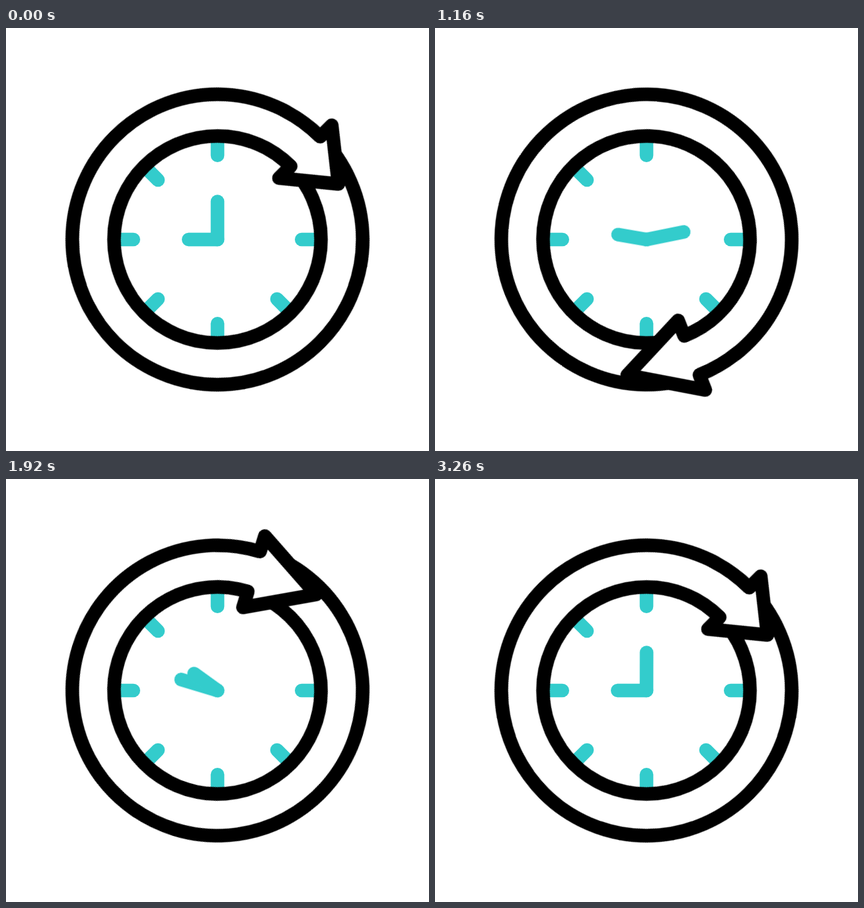
An HTML page for the animation above (3.6 s loop, 640 by 640 pixels).

```html
<!DOCTYPE html>
<html lang="en">
<head>
<meta charset="utf-8">
<title>Clock with turning arrow</title>
<style>
  html, body { margin: 0; width: 100%; height: 100%; overflow: hidden; background: #fff; }
  svg { display: block; width: 100%; height: 100%; }

  .ink, .teal { fill: none; stroke-width: 20.6; stroke-linecap: round; stroke-linejoin: round; }
  .ink { stroke: #000; }
  .teal { stroke: #33cccc; }

  .arrow, .head, .minute, .hour { animation: 3600ms linear infinite; }
  .arrow { animation-name: turn; }
  .head { animation-name: stretch; }
  .minute { animation-name: minute; }
  .hour { animation-name: hour; }

  /* Pull back, then one full turn */
  @keyframes turn {
    0% { transform: rotate(45deg); }
    5.5556% { transform: rotate(45deg); animation-timing-function: cubic-bezier(.333, 0, .667, 1); }
    16.6667% { transform: rotate(15deg); animation-timing-function: cubic-bezier(.333, 0, .3, 1); }
    68.3333%, 100% { transform: rotate(405deg); }
  }

  /* The tip shortens while pulling back and lengthens at speed */
  @keyframes stretch {
    0% { d: path("M0 -220 L0 -244.5 L70 -188.8 L0 -131.5 L0 -156.6"); }
    5.5556% {
      d: path("M0 -220 L0 -244.5 L70 -188.8 L0 -131.5 L0 -156.6");
      animation-timing-function: cubic-bezier(.333, 0, .667, 1);
    }
    16.6667% {
      d: path("M0 -220 L0 -244.5 L44.7 -187 L0 -131.5 L0 -156.6");
      animation-timing-function: cubic-bezier(.333, 0, .667, 1);
    }
    40.5556% {
      d: path("M0 -220 L0 -244.5 L124 -178 L0 -131.5 L0 -156.6");
      animation-timing-function: cubic-bezier(.333, 0, .667, 1);
    }
    68.3333%, 100% { d: path("M0 -220 L0 -244.5 L70 -188.8 L0 -131.5 L0 -156.6"); }
  }

  /* Hands run forward with the arrow, then rewind */
  @keyframes minute {
    0% { transform: rotate(0deg); }
    16.6667% { transform: rotate(0deg); animation-timing-function: cubic-bezier(.333, 0, .667, 1); }
    68.3333% { transform: rotate(360deg); animation-timing-function: cubic-bezier(.333, 0, .667, 1); }
    90.8333%, 100% { transform: rotate(0deg); }
  }
  @keyframes hour {
    0% { transform: rotate(270deg); }
    16.6667% { transform: rotate(270deg); animation-timing-function: cubic-bezier(.333, 0, .667, 1); }
    68.3333% { transform: rotate(315deg); animation-timing-function: cubic-bezier(.333, 0, .667, 1); }
    90.8333%, 100% { transform: rotate(270deg); }
  }
</style>
</head>
<body>
<svg viewBox="0 0 640 640">
  <defs>
    <path id="tick" class="teal" d="M0 -127.3V-155"/>
    <mask id="gap" maskUnits="userSpaceOnUse" x="-320" y="-320" width="640" height="640">
      <rect x="-320" y="-320" width="640" height="640" fill="#fff"/>
      <path class="head" fill="#000" d="M0 -220 L0 -244.5 L70 -188.8 L0 -131.5 L0 -156.6"/>
    </mask>
  </defs>
  <g transform="translate(320 320)">
    <use href="#tick"/>
    <use href="#tick" transform="rotate(90)"/>
    <use href="#tick" transform="rotate(135)"/>
    <use href="#tick" transform="rotate(180)"/>
    <use href="#tick" transform="rotate(225)"/>
    <use href="#tick" transform="rotate(270)"/>
    <use href="#tick" transform="rotate(315)"/>

    <path class="teal minute" d="M0 0V-57.5"/>
    <path class="teal hour" d="M0 0V-43.7"/>

    <g class="arrow">
      <g mask="url(#gap)">
        <circle class="ink" r="219.7"/>
        <circle class="ink" r="156.6"/>
      </g>
      <path class="ink head" d="M0 -220 L0 -244.5 L70 -188.8 L0 -131.5 L0 -156.6"/>
    </g>
  </g>
</svg>
</body>
</html>
```
